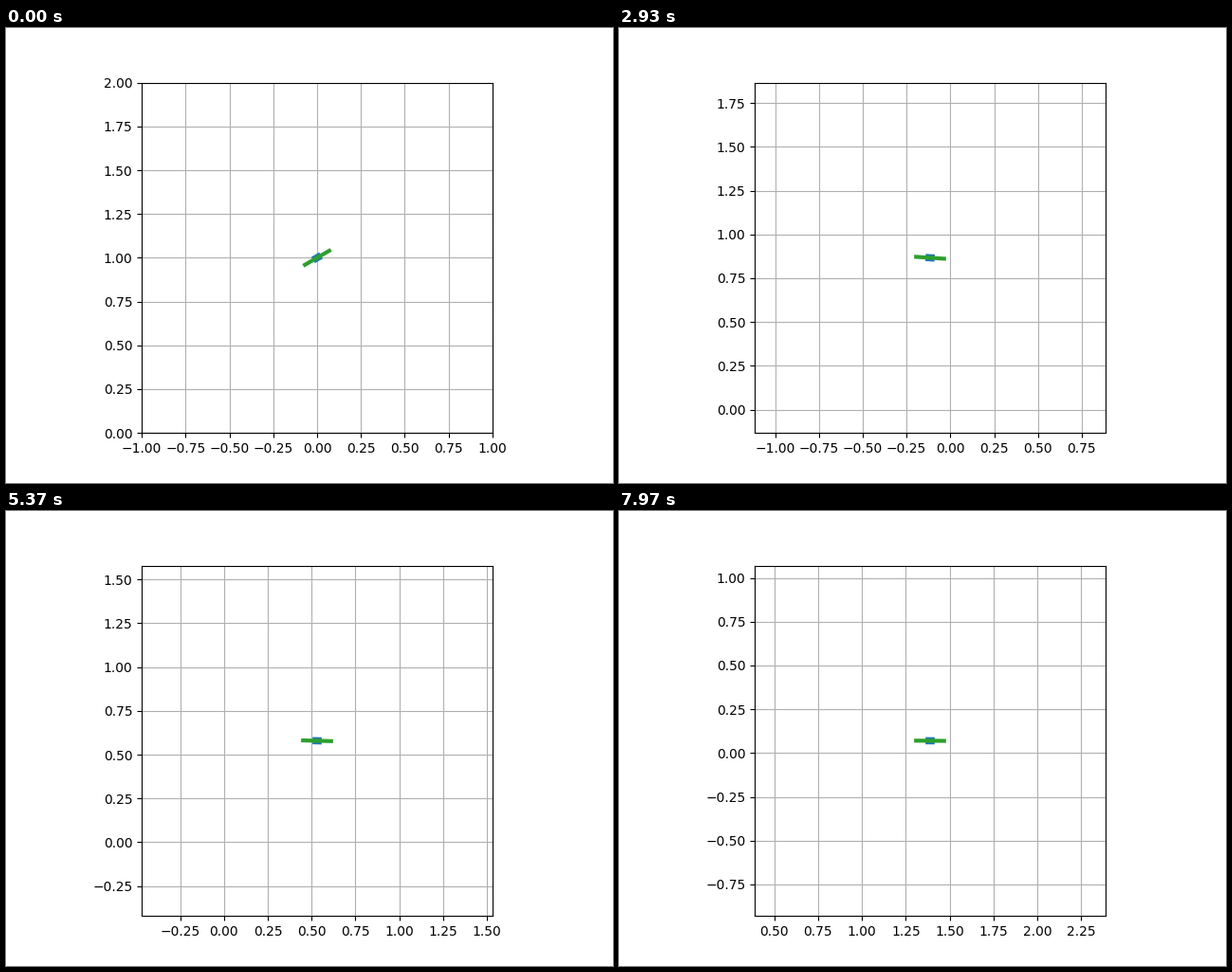
Write a matplotlib script that moves like this. It is 640 px wide and 480 px high and loops after 8 s.

```python
import numpy as np
import matplotlib.pyplot as plt
from matplotlib.animation import FuncAnimation
from matplotlib.ticker import MultipleLocator

FRAMES = 320
INTERVAL = 25    # ms
DT = 0.01        # simulated seconds per step, 30 steps per shown second
G = 9.53
SWING = 0.68     # end of the opening swing
SWING_ACC = (-5.5, 10.94, 16.6, -19.4)   # sideways acceleration, cubic in t / SWING

# waypoints after the swing: time, position and speed on each axis
T = np.array([SWING, 1.07, 1.40, 1.81, 2.09, 2.39])
X = np.array([-0.2374, 0.039, 0.333, 0.731, 1.038, 1.389])
VX = np.array([0.444, 0.85, 0.93, 1.04, 1.14, 1.19])
TY = np.append(0, T)
Y = np.array([1, 0.917, 0.808, 0.683, 0.465, 0.282, 0.070])
VY = np.array([0, -0.22, -0.33, -0.45, -0.60, -0.68, -0.72])


def hermite(t, ts, ps, vs):
    i = int(np.clip(np.searchsorted(ts, t, side="right") - 1, 0, len(ts) - 2))
    h = ts[i + 1] - ts[i]
    u = (t - ts[i]) / h
    return ((1 + 2 * u) * (1 - u) ** 2 * ps[i] + u * (1 - u) ** 2 * h * vs[i]
            + u * u * (3 - 2 * u) * ps[i + 1] + u * u * (u - 1) * h * vs[i + 1])


def position(t):
    if t < SWING:
        u = t / SWING
        x = SWING ** 2 * sum(c * u ** (n + 2) / ((n + 1) * (n + 2))
                             for n, c in enumerate(SWING_ACC))
    else:
        x = hermite(t, T, X, VX)
    return x, hermite(t, TY, Y, VY)


def tilt(t):
    if t < SWING:
        u = t / SWING
        acc = sum(c * u ** n for n, c in enumerate(SWING_ACC))
    else:
        rest = np.interp(t, [1.9, 2.39], [0.25, 0.08])
        acc = rest + 2.39 * np.exp((SWING - t) / 0.11)
    return -np.arctan2(acc, G)


fig, ax = plt.subplots(figsize=(6.4, 4.8), dpi=100)
ax.set_aspect("equal")
ax.grid(True)
for axis in (ax.xaxis, ax.yaxis):
    axis.set_major_locator(MultipleLocator(0.25))

body, = ax.plot([], [], color="C0", lw=5.5, solid_capstyle="butt")
arm, = ax.plot([], [], color="C2", lw=3)


def place(line, x, y, angle, half):
    dx, dy = half * np.cos(angle), half * np.sin(angle)
    line.set_data([x - dx, x + dx], [y - dy, y + dy])


def update(frame):
    step = (3 * frame + 2) // 4     # three simulation steps per four frames
    t = step * DT
    x, y = position(t)
    angle = tilt(t)
    place(body, x, y, angle, 0.026)
    place(arm, x, y, angle, 0.08)
    ax.set_xlim(x - 1, x + 1)
    ax.set_ylim(y - 1, y + 1)
    return body, arm


anim = FuncAnimation(fig, update, frames=FRAMES, interval=INTERVAL,
                     init_func=lambda: update(0), repeat=True)
plt.show()
```
